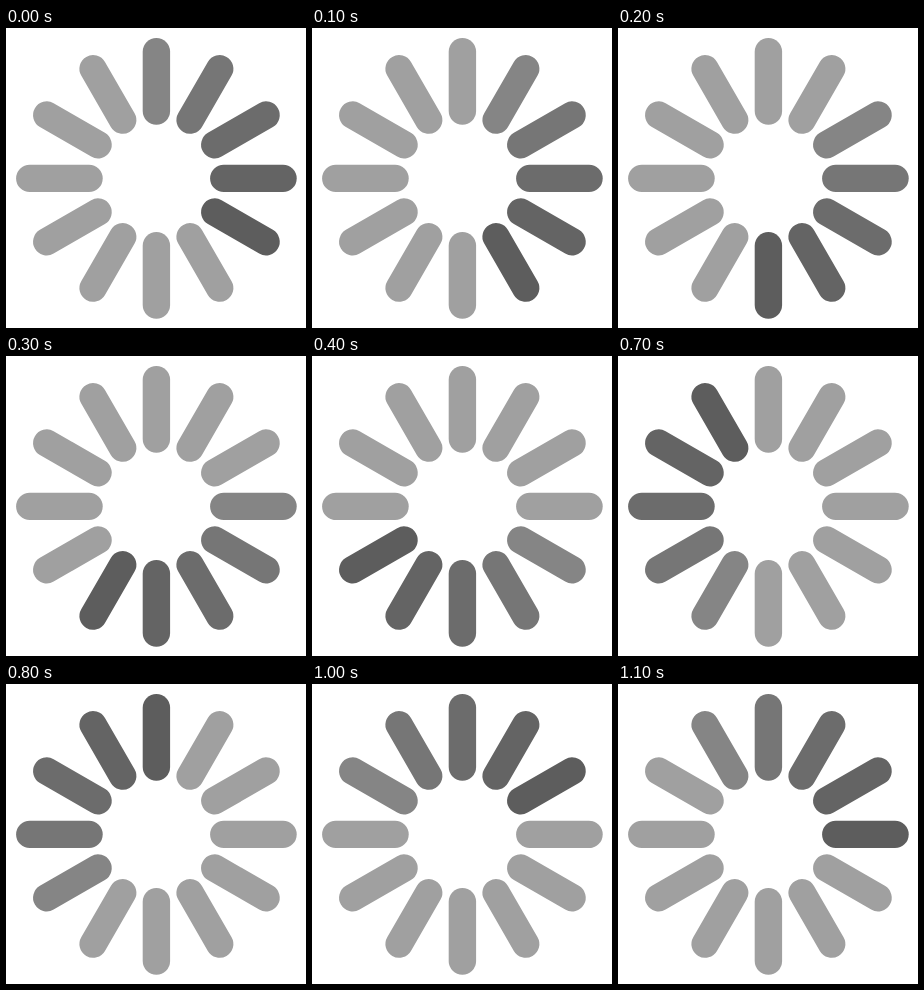
Recreate the animation shown at these times as an HTML page. Size 300x300 px, loop 1.2 s.

```html
<!DOCTYPE html>
<html lang="en">
<head>
<meta charset="utf-8">
<title>Spinner</title>
<style>
  html, body { margin: 0; width: 100%; height: 100%; overflow: hidden; background: #fff; }
  svg { display: block; width: 100%; height: 100%; }
  line { stroke-width: 27.4; stroke-linecap: round; }
</style>
</head>
<body>
<svg id="spinner" viewBox="0 0 300 300"></svg>
<script>
  const BARS = 12, STEP = 100, START = 4;
  const CENTER = 150.4, INNER = 67.4, OUTER = 126.6;
  const TAIL = ['#5d5d5d', '#646464', '#6c6c6c', '#767676', '#858585'];
  const REST = '#a0a0a0';

  const svg = document.getElementById('spinner');
  const bars = Array.from({ length: BARS }, (_, i) => {
    const bar = document.createElementNS('http://www.w3.org/2000/svg', 'line');
    bar.setAttribute('y1', -INNER);
    bar.setAttribute('y2', -OUTER);
    bar.setAttribute('transform', `translate(${CENTER} ${CENTER}) rotate(${i * 360 / BARS})`);
    return svg.appendChild(bar);
  });

  // The darkest bar advances clockwise; shades fade out behind it.
  function draw(time) {
    const head = START + Math.floor(time / STEP) % BARS;
    bars.forEach((bar, i) => {
      const age = (head - i + BARS) % BARS;
      bar.setAttribute('stroke', TAIL[age] || REST);
    });
  }

  const begin = performance.now();
  function tick() {
    draw(performance.now() - begin);
    requestAnimationFrame(tick);
  }
  tick();
</script>
</body>
</html>
```
